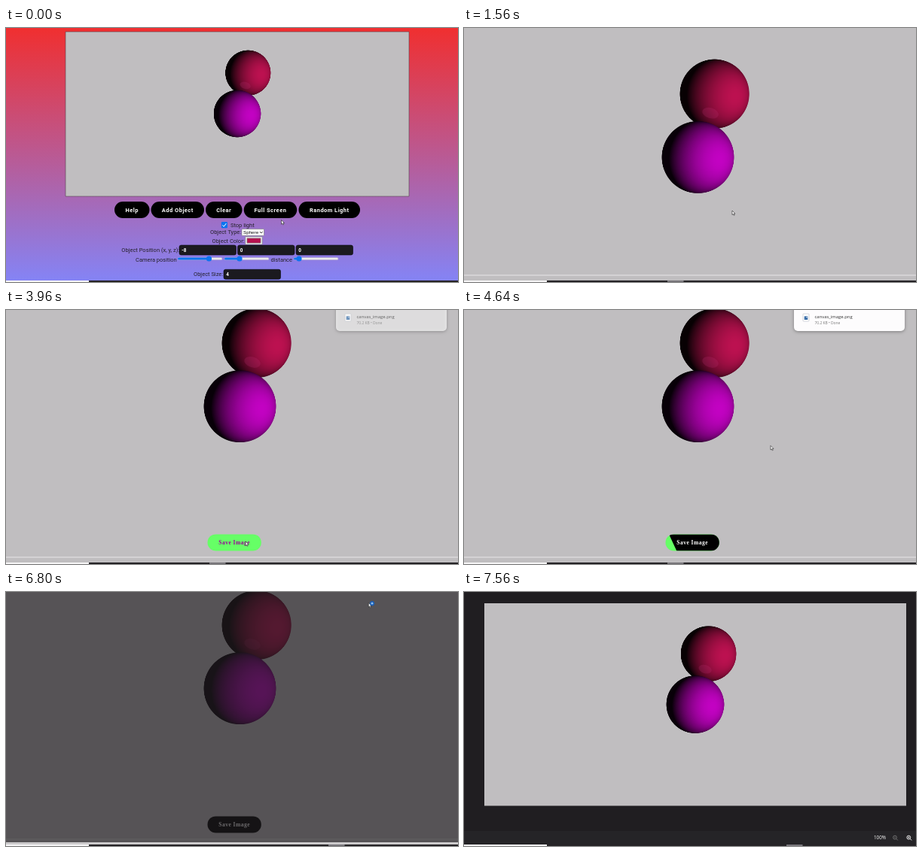
Write an HTML page with a canvas that moves like this. It is 600 px wide and 338 px high and loops after 8000 ms.

```html
<!DOCTYPE html>
<html lang="en">
<head>
<meta charset="utf-8">
<title>Sphere scene</title>
<style>
  html, body { margin: 0; width: 100%; height: 100%; overflow: hidden; background: #c0bec0; }
  canvas { display: block; width: 600px; height: 338px; }
</style>
</head>
<body>
<canvas id="stage" width="600" height="338"></canvas>
<script>
const LOOP = 8000;
const W = 600, H = 338;
const GREY = '#c0bec0', BLUE = '#0b74f0', GREEN = '#66ff66';
const SANS = 'Roboto, sans-serif';
const UI = '"Open Sans", "Noto Sans", sans-serif';
const SERIF = '"Liberation Serif", serif';
const c = document.getElementById('stage').getContext('2d');

const clamp = v => Math.max(0, Math.min(1, v));
const ramp = (t, a, b) => clamp((t - a) / (b - a));
const smooth = v => v * v * (3 - 2 * v);

// cubic-bezier(.3, 1, .8, 1)
function ease(x) {
  x = clamp(x);
  let lo = 0, hi = 1;
  for (let i = 0; i < 20; i++) {
    const u = (lo + hi) / 2, v = 1 - u;
    if (0.9 * u * v * v + 2.4 * u * u * v + u * u * u < x) lo = u; else hi = u;
  }
  return 1 - (1 - lo) ** 3;
}

function rect(x, y, w, h, fill, r = 0, stroke) {
  c.beginPath();
  c.roundRect(x, y, w, h, r);
  c.fillStyle = fill;
  c.fill();
  if (stroke) {
    c.strokeStyle = stroke;
    c.lineWidth = 0.6;
    c.stroke();
  }
}

function disc(x, y, r, fill) {
  c.beginPath();
  c.arc(x, y, r, 0, 7);
  c.fillStyle = fill;
  c.fill();
}

function line(points, color, width) {
  c.beginPath();
  points.forEach(([x, y]) => c.lineTo(x, y));
  c.strokeStyle = color;
  c.lineWidth = width;
  c.stroke();
}

function text(str, x, y, font, color, align = 'left', spacing = 0) {
  c.font = font;
  c.letterSpacing = spacing + 'px';
  c.textAlign = align;
  c.textBaseline = 'alphabetic';
  c.fillStyle = color;
  c.fillText(str, x, y);
  c.letterSpacing = '0px';
}

// Diffuse-lit ball, light from the right and front
function makeBall(rgb) {
  const size = 200, R = size / 2;
  const cv = document.createElement('canvas');
  cv.width = cv.height = size;
  const g = cv.getContext('2d');
  const img = g.createImageData(size, size);
  for (let j = 0; j < size; j++) {
    for (let i = 0; i < size; i++) {
      const x = (i + 0.5) / R - 1, y = (j + 0.5) / R - 1;
      const d = Math.hypot(x, y);
      const z = Math.sqrt(Math.max(0, 1 - d * d));
      const lit = clamp(0.6 * x + 0.07 * y + 0.8 * z);
      const k = (j * size + i) * 4;
      rgb.forEach((v, n) => img.data[k + n] = v * (0.04 + 0.96 * lit));
      img.data[k + 3] = 255 * clamp((1 - d) * R);
    }
  }
  g.putImageData(img, 0, 0);
  return cv;
}

const redBall = makeBall([188, 17, 80]);
const purpleBall = makeBall([194, 2, 194]);

function ball(sprite, x, y, r) {
  c.drawImage(sprite, x - r, y - r, 2 * r, 2 * r);
}

function spheres(rx, ry, rr, px, py, pr) {
  ball(redBall, rx, ry, rr);
  c.beginPath();
  c.ellipse(rx - 0.12 * rr, ry + 0.55 * rr, 0.24 * rr, 0.15 * rr, 0.3, 0, 7);
  c.fillStyle = 'rgba(190,50,120,.22)';
  c.fill();
  ball(purpleBall, px, py, pr);
}

function button(label, x, y, w, font, hover = 0) {
  const h = 22, cx = x + w / 2;
  c.save();
  c.beginPath();
  c.roundRect(x, y, w, h, h / 2);
  if (hover > 0) {
    c.fillStyle = GREEN;
    c.fill();
    c.clip();
    const left = x + w * (1.2 * hover - 0.1);
    const lean = 0.577 * (1 - hover) * h / 2;
    c.beginPath();
    c.moveTo(left - lean, y);
    c.lineTo(left + 1.2 * w - lean, y);
    c.lineTo(left + 1.2 * w + lean, y + h);
    c.lineTo(left + lean, y + h);
  }
  c.fillStyle = '#000';
  c.fill();
  c.globalCompositeOperation = 'difference';
  text(label, cx, y + 13.7, font, '#fff', 'center', 0.47);
  c.restore();
}

function hoverAmount(t, on, off) {
  return ease((t - on) / 400) - ease((t - off) / 400);
}

function slider(x, thumb) {
  rect(x, 305.6, 59, 3, '#efefef', 1.5, '#b5a8cc');
  rect(x, 305.6, thumb - x, 3, BLUE, 1.5);
  disc(thumb, 307, 3.6, BLUE);
}

function field(value, x, y) {
  rect(x, y, 75.5, 13, '#1b1a1f', 2.5, '#0a0a10');
  text(value, x + 3.2, y + 9, 'bold 6.3px ' + SANS, '#fff');
}

function page(t) {
  const bg = c.createLinearGradient(0, 0, 0, H);
  bg.addColorStop(0, '#f02f30');
  bg.addColorStop(1, '#8484f6');
  c.fillStyle = bg;
  c.fillRect(0, 0, W, H);

  rect(79, 5, 456, 219, GREY, 0, '#57434f');
  spheres(321.3, 59.7, 30.3, 307, 114, 31.5);

  const bold = 'bold 7.5px ' + SANS;
  button('Help', 144, 231, 46.5, bold);
  button('Add Object', 192.5, 231, 70.5, bold);
  button('Clear', 265, 231, 48.5, bold);
  button('Full Screen', 315.7, 231, 70.5, bold, hoverAmount(t, 1140, 1520));
  button('Random Light', 388.5, 231, 81.5, bold);

  const label = (s, x, y) => text(s, x, y, '7.5px ' + SANS, '#25212c');
  rect(285.8, 258, 8.2, 8.2, BLUE, 1.2);
  line([[287.4, 262.3], [289.2, 264.2], [292.4, 260]], '#fff', 1);
  label('Stop light', 298, 264.8);

  label('Object Type:', 271, 274.3);
  rect(313, 267.6, 29.5, 8.6, '#fff', 0.5, '#767676');
  text('Sphere', 315, 274.2, '6.25px "Liberation Sans", sans-serif', '#111');
  line([[337, 271], [338.8, 273], [340.6, 271]], '#222', 0.9);

  label('Object Color:', 273.5, 286.2);
  rect(317.7, 277.7, 22.5, 10.4, '#efefef', 0.5, '#767676');
  rect(320, 279.8, 18, 6.3, '#b8104e', 0, '#777');

  label('Object Position (x, y, z):', 153.3, 298);
  field('-8', 230, 289);
  field('0', 307.5, 289);
  field('0', 385, 289);

  label('Camera position', 172, 310.7);
  slider(228, 269.5);
  slider(290, 310);
  label('distance', 351.5, 310.7);
  slider(382, 389);

  label('Object Size:', 249, 330.2);
  field('4', 289, 321.3);
}

function popup(alpha) {
  if (alpha <= 0) return;
  c.save();
  c.globalAlpha = alpha;
  c.shadowColor = 'rgba(0,0,0,.35)';
  c.shadowBlur = 4;
  c.shadowOffsetY = 1;
  rect(438, -12, 147, 40, '#fdfcfd', 5);
  c.shadowColor = 'transparent';
  rect(450, 5, 8, 10, '#fff', 0.8, '#b9bdc6');
  rect(451.7, 8.3, 4.6, 4.6, '#3a6ea8', 0.5);
  disc(455, 9.6, 0.8, '#e8eef5');
  text('canvas_image.png', 465.5, 11.2, '5.9px ' + UI, '#333');
  text('70.2 KB • Done', 465.5, 18.7, '4.9px ' + UI, '#777');
  c.restore();
}

function fullScreen(t) {
  rect(0, 0, W, H, GREY);
  const open = t >= 1640;
  const dy = open ? 0 : 43.7;
  spheres(332.6, 44 + dy, 46.3, 310.5, 128.2 + dy, 48.2);
  if (open) {
    button('Save Image', 267.5, 298.4, 71.3, 'bold 7.5px ' + SERIF, hoverAmount(t, 3300, 4462));
  }
  rect(0, 328.5, W, 1, '#e9e8e9');
  popup(ramp(t, 3860, 4000) - ramp(t, 6200, 6290));
}

function magnifier(x, y, color, plus) {
  c.beginPath();
  c.arc(x, y, 2.4, 0, 7);
  c.strokeStyle = color;
  c.lineWidth = 0.9;
  c.stroke();
  line([[x + 1.8, y + 1.8], [x + 3.8, y + 3.8]], color, 1);
  line([[x - 1.2, y], [x + 1.2, y]], color, 0.7);
  if (plus) line([[x, y - 1.2], [x, y + 1.2]], color, 0.7);
}

function viewer(t) {
  const alpha = ramp(t, 6720, 6841);
  if (alpha <= 0) return;
  c.save();
  c.globalAlpha = alpha;
  rect(0, 0, W, t < 6880 ? 333 : 336, '#201e21');
  if (t < 6880) rect(0, 333, W, 3, '#d2d0d2');
  const shown = ramp(t, 7040, 7200);
  if (shown > 0) {
    c.globalAlpha = shown;
    rect(0, 318, W, 18, '#252427');
    rect(27, 15, 560, 269.5, GREY);
    spheres(324.6, 82.2, 37.1, 306.9, 149.6, 38.6);
    text('100%', 544, 329.3, '6.3px ' + UI, '#fff');
    magnifier(572, 326.6, '#777', false);
    magnifier(590.3, 326.6, '#fff', true);
  }
  c.restore();
}

function taskbar(t) {
  rect(0, 336, W, 2, '#252326');
  rect(0, 336, 110, 2, '#f6f5f6');
  if (t >= 1520) rect(t < 6300 ? 270 : 428, 336, 21.5, 2, '#77757a');
}

const path = [
  [0, 365.5, 255.5], [40, 365.5, 255.5], [840, 436, 258], [920, 436, 258],
  [1090, 372, 257], [1240, 356, 243], [1880, 356, 243], [2360, 361, 239],
  [2560, 361, 239], [2640, 362, 236], [3040, 362, 236], [3400, 318, 308],
  [4410, 318, 308], [4640, 407, 180.5], [5300, 468, 42], [5600, 481.3, 14.5],
  [LOOP, 481.3, 14.5]
];

function cursor(t) {
  if (t >= 7060) return;
  const i = path.findIndex(p => p[0] > t);
  const [t0, x0, y0] = path[i - 1], [t1, x1, y1] = path[i];
  const k = smooth(ramp(t, t0, t1));
  c.save();
  c.translate(x0 + (x1 - x0) * k, y0 + (y1 - y0) * k);
  c.scale(0.4, 0.4);
  c.beginPath();
  [[0, 0], [0, 14], [3.3, 11], [5.6, 16], [8, 15], [5.8, 10], [10, 10]].forEach(p => c.lineTo(...p));
  c.closePath();
  c.fillStyle = '#fff';
  c.fill();
  c.strokeStyle = '#222';
  c.lineWidth = 1.5;
  c.stroke();
  c.restore();
  if (t >= 6720) {
    disc(486, 15.2, 3.1, '#1d5fb4');
    disc(486, 15.2, 1.4, '#8fc0f0');
  }
}

function draw(now) {
  const t = now % LOOP;
  c.clearRect(0, 0, W, H);
  if (t < 1520) page(t); else fullScreen(t);
  viewer(t);
  taskbar(t);
  cursor(t);
}

let start;
function tick(now) {
  start ??= now;
  draw(now - start);
  requestAnimationFrame(tick);
}
draw(0);
requestAnimationFrame(tick);
</script>
</body>
</html>
```
